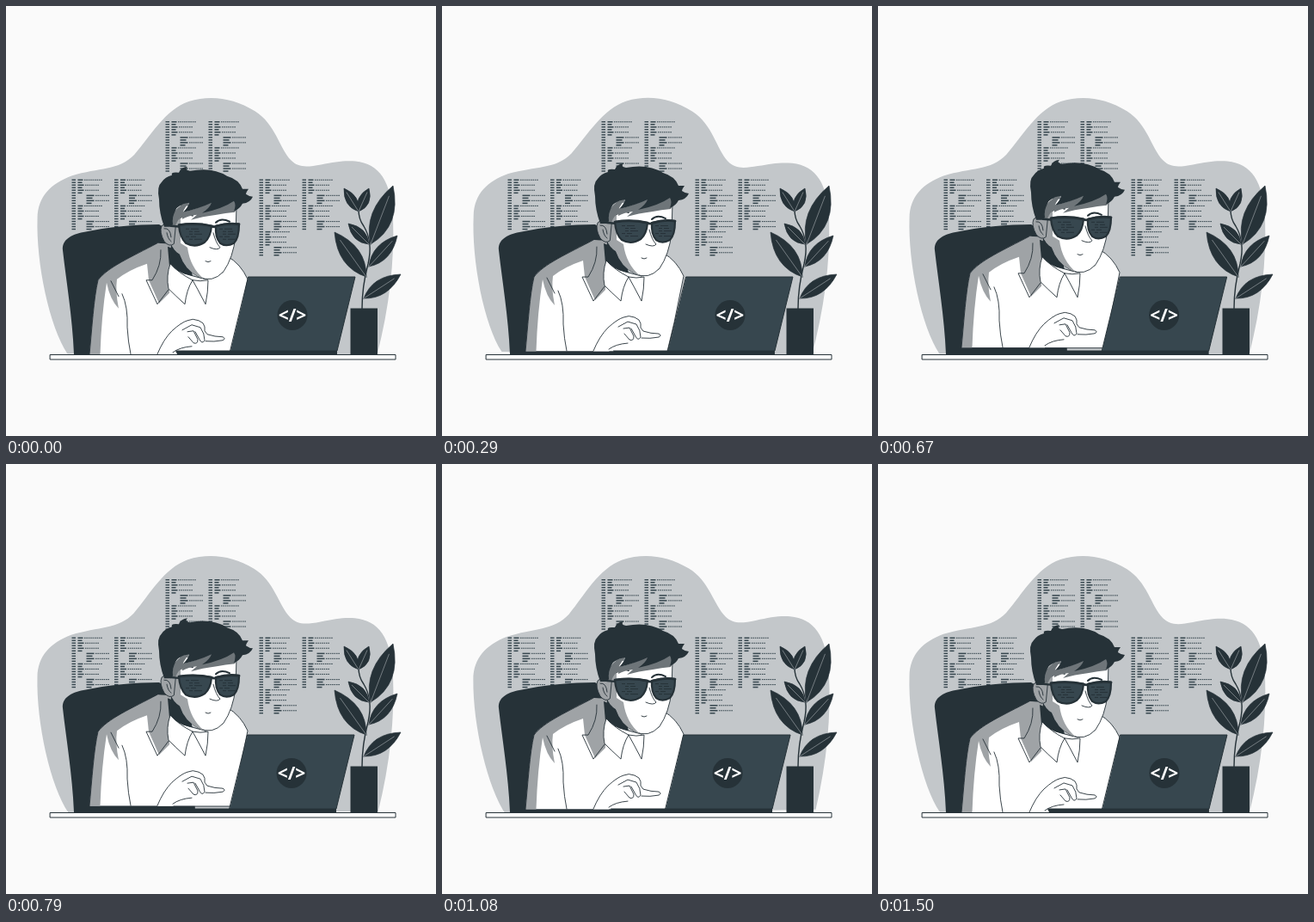
Write an HTML page with a canvas that moves like this. It is 500x500 px and loops after 1.54 s.

```html
<!DOCTYPE html>
<html lang="en">
<head>
<meta charset="utf-8">
<title>Coder at a laptop</title>
<style>
  html, body { margin: 0; width: 100%; height: 100%; overflow: hidden; background: #fafafa; }
  canvas { display: block; width: 500px; height: 500px; }
</style>
</head>
<body>
<canvas id="stage"></canvas>
<script>
const LOOP = 1540;
const DARK = '#263238', SLATE = '#37474f', WALL = '#c3c7ca', SHADE = '#9fa3a6', LOCK = '#6e7579';

const canvas = document.getElementById('stage');
const ctx = canvas.getContext('2d');
const ratio = window.devicePixelRatio || 1;
canvas.width = canvas.height = 500 * ratio;

function shape(d, fill, stroke, width = 0.9) {
  const path = new Path2D(d);
  if (fill) {
    ctx.fillStyle = fill;
    ctx.fill(path);
  }
  if (stroke) {
    ctx.strokeStyle = stroke;
    ctx.lineWidth = width;
    ctx.stroke(path);
  }
}

const line = (d, width = 0.9, color = DARK) => shape(d, null, color, width);

function moved(x, y, draw) {
  ctx.save();
  ctx.translate(x, y);
  draw();
  ctx.restore();
}

// Each code row: [indent of second token, its length, end of the dotted tail]
const ROWS = {
  outer: [[7, 6, 35], [7, 5, 0], [7, 7, 31], [7, 5, 0], [7, 7, 31]],
  inner: [[7, 5, 0], [17, 9, 44], [17, 7, 0], [17, 9, 42], [17, 6, 0]]
};

function codeBlock(x, y, rows) {
  ctx.fillStyle = SLATE;
  rows.forEach(([start, length, end], i) => {
    const rowY = y + i * 3;
    ctx.fillRect(x, rowY, 4.5, 1.4);
    ctx.fillRect(x + start, rowY, length, 1.5);
    for (let dot = start + length + 1.5; dot < end; dot += 2.4) {
      ctx.fillRect(x + dot, rowY + 0.2, 1.5, 1.1);
    }
  });
}

function codeColumn(x, y, blocks) {
  for (let i = 0; i < blocks; i++) {
    codeBlock(x, y + i * 15.1, i % 2 ? ROWS.inner : ROWS.outer);
  }
}

function drawWall(angle) {
  ctx.save();
  ctx.translate(244, 257);
  ctx.rotate(angle);
  ctx.translate(-244, -257);
  shape(`M72 405 C51 374 35 300 36.5 247 C37 222 52 207 76 198 C108 188 131 192 149 173
    C168 151 184 121 212 111 C238 103 264 107 289 122 C313 137 317 164 331 179
    C340 188 350 187 366 184 C382 181 392 179 406 180 C434 183 448 203 450 246
    C452 296 446 350 432 405 Z`, WALL);
  ctx.restore();
  codeColumn(185.5, 134, 4);
  codeColumn(235.5, 134, 4);
  codeColumn(76.5, 201.5, 4);
  codeColumn(126, 201.5, 4);
  codeColumn(294.5, 201.5, 6);
  codeColumn(344.5, 201.5, 4);
}

function drawChair() {
  shape(`M79 405 C77 360 70 320 66 284 C65 272 75 266 90 263 C118 257 150 254 178 254
    L215 275 L220 405 Z`, DARK);
}

function drawBody() {
  shape(`M97 405.5 C100 375 102 340 107 319 C118 304 146 292 176 276 L190 277
    L191 300 Q200 310 213 313 L232 318 L252 310 L257 291 Q273 300 281 318
    L270 372 L262 405.5 Z`, '#fff', DARK);
  shape(`M97 405.5 C100 375 102 340 107 319 C118 304 146 292 176 276 L192 277
    L190 334 L178 346 L166 319 L164 300 Q143 307 129 318 Q127 332 131 352
    Q121 342 117 322 Q111 360 109.5 405.5 Z`, SHADE);
  line('M97 405.5 C100 375 102 340 107 319 C118 304 146 292 176 276');
  line('M135 335 Q142 350 141 374 Q142 391 145 405');
  line('M122 320 L131 338 M180 284 Q181 302 170 319 L163 319 L176 347 L189 330');
  shape('M188 280 L203 286 L217 314 L206 311 L190 303 Z', DARK);
  shape('M191 300 Q186 314 189 329 Q197 337 208 347 Q210 330 217 319 Q201 311 191 300 Z', '#fff', DARK);
  shape('M217 319 L223 330 L232 347 Q235 333 235 319 Q226 321 217 319 Z', '#fff', DARK);
}

function drawHand() {
  shape(`M176 405.5 Q183 388 193 378 Q204 368 211 366 Q217 363 224 366 L229 369
    Q232 373 231 378 L234 382 Q243 385 252 385 Q256 387 252 389 Q242 391 232 390
    L229 393 L220 397 Q209 399 199 402 L194 405.5 Z`, '#fff');
  line(`M176 405 Q183 388 193 378 Q204 368 211 366 Q217 363 224 366 L229 369
    Q232 373 231 378 L234 382 Q243 385 252 385 Q256 387 252 389 Q242 391 232 390
    M194 403 Q202 397 216 396 M205 377 L216 371 L226 374 Q231 381 231 389
    Q228 394 225 388 L220 379 M211 379 L218 378 L223 388 Q223 394 218 392 L212 385`);
}

function drawFace() {
  shape('M190 238 L191 275 Q195 285 202 289 Q208 307 224 315 Q240 323 253 309 Q264 293 267 268 L268 232 L196 232 Z', '#fff', DARK);
  shape('M190 238 L191 275 Q195 285 202 289 Q208 307 224 315 L230 317.5 Q214 304 211 281 L203 276 L203 240 Z', SHADE);
  shape('M197 256 Q188 249 181 256 Q178 263 184 274 Q190 281 195 277 Z', SHADE, DARK);
  line('M184 259 Q191 258 192 269 M187 264 Q188 271 192 274');
  line('M241 264 Q244 276 249 281 Q246 285 237 281 M232 297 Q235 299 238 297');
  line('M203 246 Q209 241 217 244', 1.8);
  line('M244 252 Q250 246 260 251', 2);
}

function drawHair() {
  shape(`M205 240 Q224 236 238 228 L266 226 Q270 234 266 240 Q255 241 245 243
    Q228 245 215 249 L222 243 Q212 244 205 248 Z`, LOCK);
  shape('M195 240 Q204 229 214 228 Q204 238 205 246 Q200 247 197 256 L193 256 Z', LOCK);
  shape(`M184 257 Q178 241 178 225 Q175 210 181 205 Q185 199 193 197 Q191 193 201 194
    Q203 188 211 187 Q207 191 214 192 Q240 187 257 198 Q271 202 275 213 L282 213
    Q279 217 279 219 Q283 222 287 222 Q284 229 275 230 Q272 236 265 239
    Q268 231 265 227 Q252 236 228 241 Q237 235 239 229 Q224 236 206 240
    Q212 234 213 229 Q200 231 197 238 Q193 246 194 254 L192 257 Z`, DARK);
}

function lens(d, x, y) {
  shape(d, SLATE, DARK, 2.2);
  ctx.fillStyle = DARK;
  for (let i = 0; i < 5; i++) {
    const indent = i % 3 ? 4 : 0;
    ctx.fillRect(x + indent, y + i * 3, 4, 1);
    ctx.fillRect(x + indent + 6, y + i * 3, 9 - i % 2 * 3, 1);
  }
}

function drawGlasses() {
  line('M192 256 L204 257', 2.4);
  lens('M201 255 Q220 252 239 256 Q238 269 231 275 Q220 282 209 276 Q202 269 201 255 Z', 209, 259);
  lens('M244 256 Q258 252 271 254 Q271 270 265 276 Q256 281 249 276 Q243 269 244 256 Z', 248, 259);
  line('M201 255 Q220 252 239 256 Q242 258 245 256 Q258 252 271 254', 2.8);
}

function drawPerson() {
  drawBody();
  drawHand();
  drawFace();
  drawHair();
  drawGlasses();
}

function drawLaptop() {
  shape('M197 400.5 H385 V405 H199 Z', DARK);
  shape('M282 315 H406 L385 401 H261 Z', SLATE, DARK, 1);
  ctx.fillStyle = DARK;
  ctx.beginPath();
  ctx.arc(333, 359.5, 17.5, 0, Math.PI * 2);
  ctx.fill();
  ctx.fillStyle = '#fff';
  ctx.font = 'bold 21px "Noto Sans", sans-serif';
  ctx.textAlign = 'center';
  ctx.fillText('</>', 333, 367);
}

// A leaf bulges by the given amounts on either side of its midrib.
function leaf(x, y, tipX, tipY, left, right) {
  const dx = tipX - x, dy = tipY - y, len = Math.hypot(dx, dy);
  const side = amount => [
    x + dx * 0.45 - dy / len * amount,
    y + dy * 0.45 + dx / len * amount
  ];
  shape(`M${x} ${y} Q${side(-left)} ${tipX} ${tipY} Q${side(right)} ${x} ${y} Z`, DARK, DARK, 0.7);
  line(`M${x} ${y} L${x + dx * 0.82} ${y + dy * 0.82}`, 0.5, WALL);
}

function drawPlant() {
  line('M414 352 Q414 326 421 300 Q427 274 416 256 Q410 248 410 237', 1.4);
  leaf(424, 277, 450, 209, 22, 26);
  leaf(419, 315, 382, 263, 21, 21);
  leaf(422, 303, 455, 267, 16, 16);
  leaf(416, 340, 459, 312, 17, 16);
  leaf(422, 277, 398, 253, 13, 13);
  leaf(410, 239, 393, 212, 12, 12);
  leaf(410, 239, 422, 212, 12, 13);
  shape('M400.5 351.5 H432 V405 H400.5 Z', DARK);
}

function drawDesk() {
  shape('M51.5 405.5 H453 V411 H51.5 Z', '#fff', DARK, 1);
}

const SHAKE = [0, -1, 2, -2, 2, -2, 2, -1, 1, -0.5, 0];

function shakeAt(progress) {
  const step = progress * 10, i = Math.floor(step), part = step - i;
  const eased = 1 - (1 - part) ** 2;
  return SHAKE[i] + (SHAKE[i + 1] - SHAKE[i]) * eased;
}

function render(time) {
  const t = time % LOOP;
  const phase = 2 * Math.PI * (t + 85) / LOOP;
  const wind = 2 * Math.PI * (t + 50) / LOOP;

  ctx.setTransform(ratio, 0, 0, ratio, 0, 0);
  ctx.lineJoin = ctx.lineCap = 'round';
  ctx.fillStyle = '#fafafa';
  ctx.fillRect(0, 0, 500, 500);

  drawWall(Math.sin(wind) * Math.PI / 180);
  drawChair();
  moved(0, -4.1 * (1 - Math.cos(phase)), drawPerson);
  moved(shakeAt(t / LOOP), 0, drawLaptop);
  drawPlant();
  drawDesk();
}

const begin = performance.now();
function frame() {
  render(performance.now() - begin);
  requestAnimationFrame(frame);
}
frame();
</script>
</body>
</html>
```
